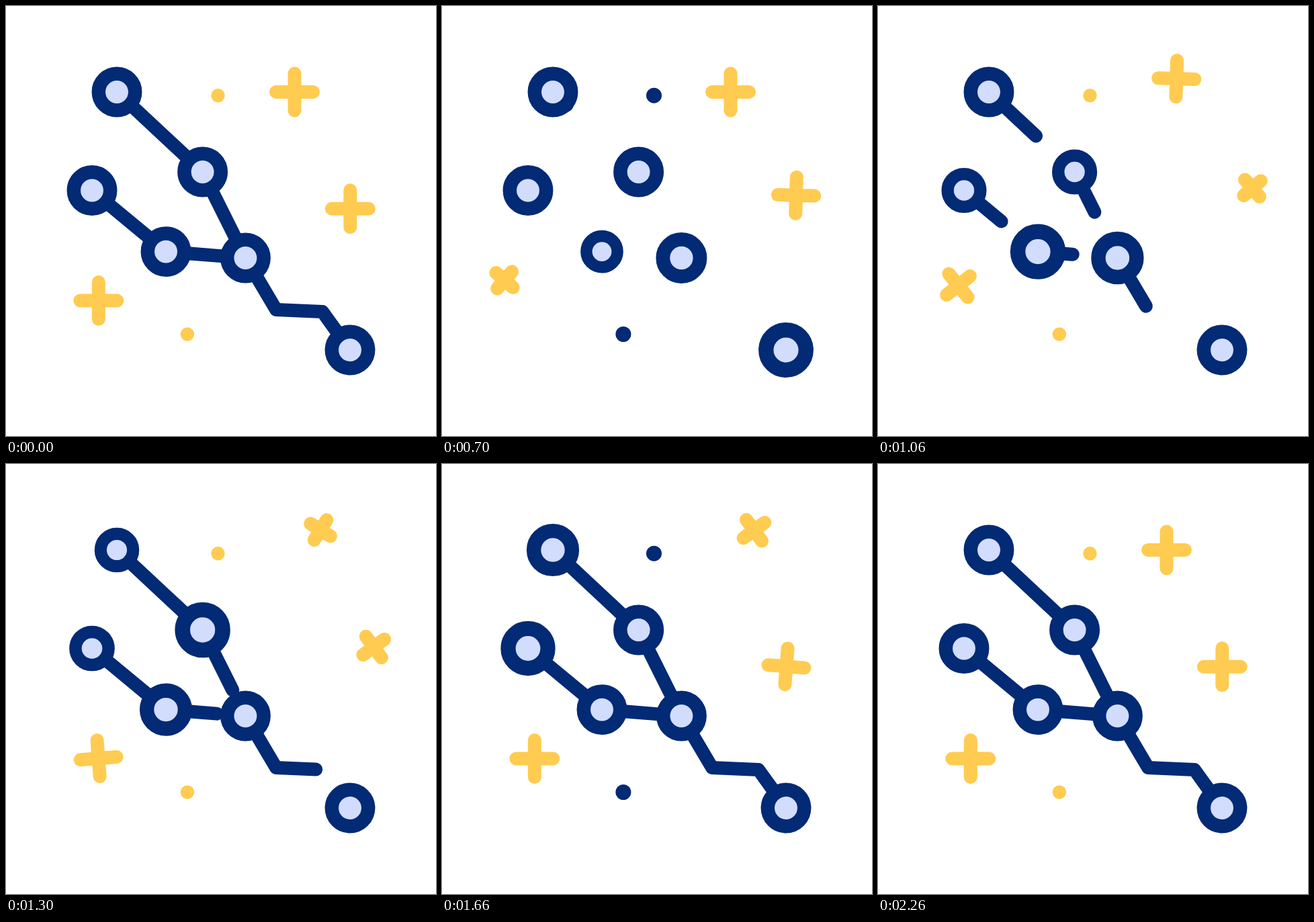
An HTML page for the animation above (2400 ms loop, 640 by 640 pixels).

```html
<!DOCTYPE html>
<html lang="en">
<head>
<meta charset="utf-8">
<title>Constellation</title>
<style>
html, body { margin: 0; width: 100%; height: 100%; overflow: hidden; background: #fff; }
svg { display: block; width: 100%; height: 100%; }
path { fill: none; stroke-width: 20; stroke-linecap: round; stroke-linejoin: round; }
</style>
</head>
<body>
<svg id="sky" viewBox="0 0 640 640"></svg>
<script>
const LOOP = 2400;
const NAVY = '#022a75', GOLD = '#ffcb50', PALE = '#d2ddfe';
const RING = 27.2;
const sky = document.getElementById('sky');

function add(parent, tag, attrs) {
  const el = document.createElementNS('http://www.w3.org/2000/svg', tag);
  for (const k in attrs) el.setAttribute(k, attrs[k]);
  return parent.appendChild(el);
}

const ease = x => 0.5 - 0.5 * Math.cos(Math.PI * x);
const linear = x => x;

// keys: [time, value] pairs in rising time order
function track(keys, t, curve = ease) {
  if (t <= keys[0][0]) return keys[0][1];
  for (let i = 1; i < keys.length; i++) {
    const [t0, a] = keys[i - 1], [t1, b] = keys[i];
    if (t < t1) return a + (b - a) * curve((t - t0) / (t1 - t0));
  }
  return keys[keys.length - 1][1];
}

const A = [165, 128], B = [292.6, 247], C = [128, 274.5];
const D = [238, 365.6], E = [356.4, 375], F = [512, 512];

function toward(p, q, dist) {
  const k = dist / Math.hypot(q[0] - p[0], q[1] - p[1]);
  return [p[0] + (q[0] - p[0]) * k, p[1] + (q[1] - p[1]) * k];
}

// Links, in the order they withdraw and grow back
const links = [[A, B], [C, D], [B, E], [D, E], [E, [402, 452], [471, 455], F]].map(pts => {
  const n = pts.length - 1;
  const line = pts.slice();
  line[0] = toward(pts[0], pts[1], RING);
  line[n] = toward(pts[n], pts[n - 1], RING);
  return add(sky, 'path', { d: 'M' + line.join('L'), stroke: NAVY, pathLength: 1 });
});

// Stars, in the order they pulse
const PULSE_GAP = 233;
const PULSE = [[0, 1], [205, 0.85], [268, 0.85], [600, 1.1], [640, 1.1], [1000, 1]];
const nodes = [F, E, D, B, C, A].map(([x, y]) => {
  const g = add(sky, 'g', {});
  add(g, 'circle', { r: RING, fill: PALE, stroke: NAVY, 'stroke-width': 20.5 });
  return { g, x, y };
});

const dots = [
  { x: 315.5, y: 133.2, on: 200 },
  { x: 269.9, y: 488.5, on: 460 }
].map(d => ({ ...d, el: add(sky, 'circle', { cx: d.x, cy: d.y }) }));

const SPARK_GAP = 360;
const SPARK = {
  path: [[15, 0], [730, 1], [800, 1], [1330, 0]],
  turn: [[280, 0], [845, 58], [1400, 0]],
  arm: [[300, 27.5], [640, 16.7], [700, 16.7], [1400, 27.5]]
};
const sparks = [[137.8, 438.5, -1], [512.3, 301.7, 1], [429.5, 128, 1]]
  .map(([x, y, side]) => ({ x, y, side, el: add(sky, 'path', { stroke: GOLD }) }));

function draw(t) {
  links.forEach((el, i) => {
    const out = 33.3 * i, back = 695 + 40 * i;
    const len = track([[out, 1], [out + 533, 0], [back, 0], [back + 640, 1]], t, linear);
    el.style.display = len > 0 ? '' : 'none';
    el.setAttribute('stroke-dasharray', len + ' 3');
  });

  nodes.forEach(({ g, x, y }, i) => {
    const s = track(PULSE, t - i * PULSE_GAP);
    g.setAttribute('transform', `translate(${x} ${y}) scale(${s})`);
  });

  dots.forEach(({ el, on }) => {
    const dark = t >= on && (t - on) % 1200 < 600;
    el.setAttribute('fill', dark ? NAVY : GOLD);
    el.setAttribute('r', dark ? 11.5 : 10.2);
  });

  sparks.forEach(({ el, x, y, side }, i) => {
    const k = t - i * SPARK_GAP;
    const u = track(SPARK.path, k), v = 2 * u * (1 - u);
    const dx = 13 * v + 45 * u * u, dy = -29 * v - 30.5 * u * u;
    const a = track(SPARK.arm, k), turn = track(SPARK.turn, k) * side;
    el.setAttribute('d', `M${-a} 0H${a}M0 ${-a}V${a}`);
    el.setAttribute('transform', `translate(${x + dx * side} ${y + dy}) rotate(${turn})`);
  });
}

const start = performance.now();
function tick() {
  draw((performance.now() - start) % LOOP);
  requestAnimationFrame(tick);
}
tick();
</script>
</body>
</html>
```
